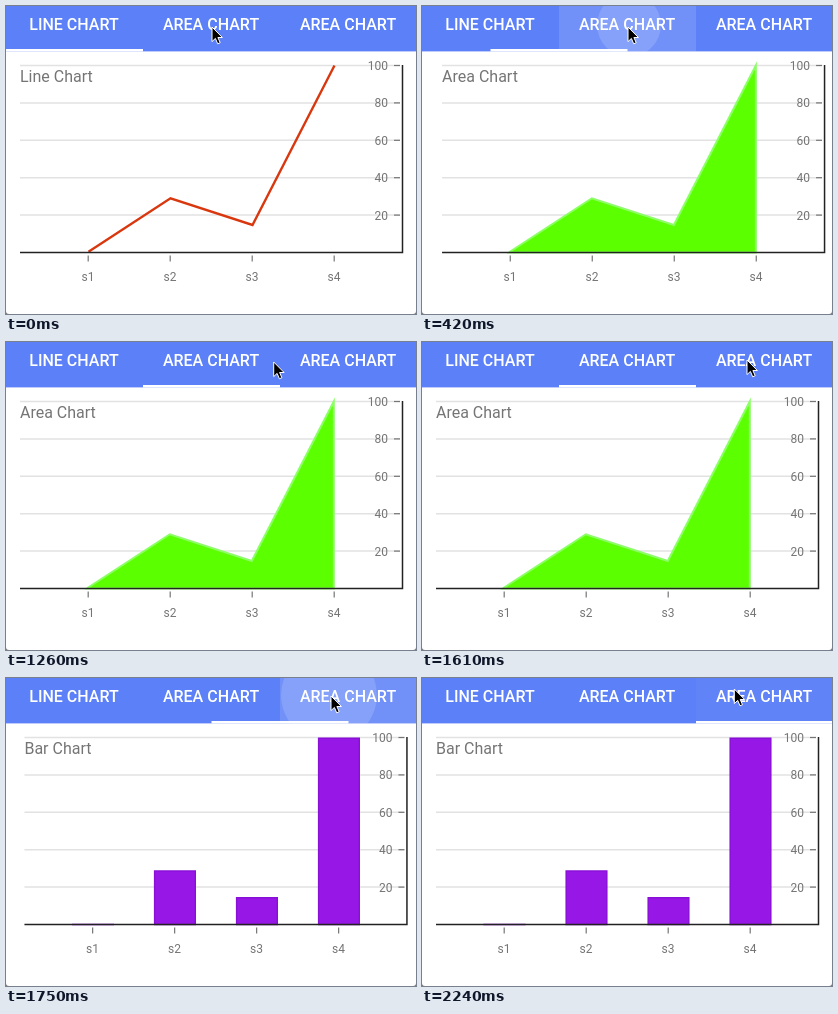
These frames come from a looping animation (410x308 px, 2310 ms). An HTML page:

```html
<!DOCTYPE html>
<html lang="en">
<head>
<meta charset="utf-8">
<title>Chart tabs</title>
<style>
  html, body { margin: 0; width: 100%; height: 100%; overflow: hidden; background: #fff; }
  svg { display: block; }
  text { font: 12px Roboto, Arial, sans-serif; fill: #757575; }
  .title { font-size: 16px; }
  .tab { font-size: 16px; font-weight: 500; fill: #fff; text-anchor: middle; }
  .mid { text-anchor: middle; }
  .end { text-anchor: end; }
  .grid { stroke: #e2e2e2; stroke-width: 1.5; }
  .tick { stroke: #757575; stroke-width: 1.2; }
  .axis { stroke: #222; stroke-width: 1.5; fill: none; }
  .line { stroke: #d9380f; stroke-width: 2.4; fill: none; }
  .area { stroke: #8cff66; stroke-width: 2; stroke-miterlimit: 6; fill: #5cff00; }
  .bar { stroke: #8a10d8; stroke-width: 1.5; fill: #9718e6; }
</style>
</head>
<body>
<svg id="stage" width="410" height="308" viewBox="0 0 410 308">
  <g id="pages"></g>
  <rect width="410" height="45.4" fill="#5c80f8"/>
  <svg id="touch" y="0" width="137" height="45.4">
    <rect width="137" height="46" fill="#fff" opacity=".13"/>
    <circle id="ripple" fill="#fff" opacity=".14"/>
  </svg>
  <rect id="underline" y="43" width="137" height="2.5" fill="#fff"/>
  <g id="tabs"></g>
  <path d="M0 305V308H3Q0 308 0 305M410 305V308H407Q410 308 410 305" fill="#777"/>
  <path id="cursor" d="M0 0V14.6L3.4 11.4 5.7 16.8 8.2 15.7 5.9 10.5H10.4Z" fill="#000" stroke="#fff"/>
</svg>
<script>
const LOOP = 2310, STEP = 70, WIDTH = 410, TAB = 137, BASE = 246.5;
const $ = id => document.getElementById(id);

const values = [0.4, 29, 14.7, 100];
const xs = [82.5, 164.5, 246.5, 328.5];
const yOf = v => BASE - v * 1.87;

const text = (cls, x, y, s) => `<text class="${cls}" x="${x}" y="${y}">${s}</text>`;
const path = (cls, d) => `<path class="${cls}" d="${d}"/>`;
const outline = dx => xs.map((x, i) => `${x + dx} ${yOf(values[i])}`).join('L');

const plots = [
  ['Line Chart', path('line', 'M' + outline(0))],
  ['Area Chart', path('area', `M${outline(-.7)}V${BASE}H81Z`)],
  ['Bar Chart', xs.map((x, i) =>
    path('bar', `M${x - 20.3} ${BASE}V${yOf(values[i]) + .7}h40.6V${BASE}Z`)).join('')]
];

function page([title, plot], index) {
  let grid = '', scale = '';
  for (let v = 20; v <= 100; v += 20) {
    const y = yOf(v);
    grid += path('grid', `M14 ${y}H394`);
    scale += path('tick', `M388 ${y}h6`) + text('end', 382, y + 4.4, v);
  }
  xs.forEach((x, i) => {
    scale += path('tick', `M${x - .3} 249.5v6`) + text('mid', x - .5, 275, 's' + (i + 1));
  });
  return `<g transform="translate(${index * WIDTH})">${grid}${plot}` +
    path('axis', `M14 ${BASE}H396.5V59`) + scale + text('title', 14, 76, title) + '</g>';
}

$('pages').innerHTML = plots.map(page).join('');
$('tabs').innerHTML = ['LINE CHART', 'AREA CHART', 'AREA CHART']
  .map((s, i) => text('tab', 68 + i * TAB, 24, s)).join('');

const clamp = u => Math.min(1, Math.max(0, u));
const smooth = u => u * u * (3 - 2 * u);
const settle = u => 1 - (1 - u) ** 5;

const taps = [
  { start: 289, slide: 230, press: 326, x: 207, y: 19, tab: 1 },
  { start: 1619, slide: 220, press: 1609, x: 323, y: 17, tab: 2 }
];

// time, x, y
const route = [
  [0, 206, 21], [720, 206, 21], [1000, 316, 13], [1260, 267.7, 20],
  [1540, 325, 18], [1960, 325, 18], [2240, 312.3, 11], [LOOP, 312.3, 11]
];

function cursorAt(t) {
  const i = route.findIndex(k => k[0] > t);
  const [t0, x0, y0] = route[i - 1], [t1, x1, y1] = route[i];
  const u = smooth((t - t0) / (t1 - t0));
  return [x0 + (x1 - x0) * u, y0 + (y1 - y0) * u];
}

function draw(t) {
  let scroll = 0, mark = 0;
  for (const tap of taps) {
    scroll += settle(clamp((t - tap.start) / tap.slide));
    mark += smooth(clamp((t - tap.start) / 262));
  }
  $('pages').setAttribute('transform', `translate(${-scroll * WIDTH})`);
  $('underline').setAttribute('x', mark * TAB);

  const tap = t < 1500 ? taps[0] : taps[1];
  const age = t - tap.start;
  $('touch').setAttribute('x', tap.tab * TAB);
  $('touch').setAttribute('opacity', age < 0 ? 0 : clamp(1 - (age - 200) / 470));
  const ripple = $('ripple');
  ripple.setAttribute('cx', tap.x - tap.tab * TAB);
  ripple.setAttribute('cy', tap.y);
  ripple.setAttribute('r', Math.max(0, (t - tap.press) * .34));

  $('cursor').setAttribute('transform', `translate(${cursorAt(t)})`);
}

const begin = performance.now();
function tick() {
  const t = (performance.now() - begin) % LOOP;
  draw(Math.floor(t / STEP) * STEP);
  requestAnimationFrame(tick);
}
tick();
</script>
</body>
</html>
```
